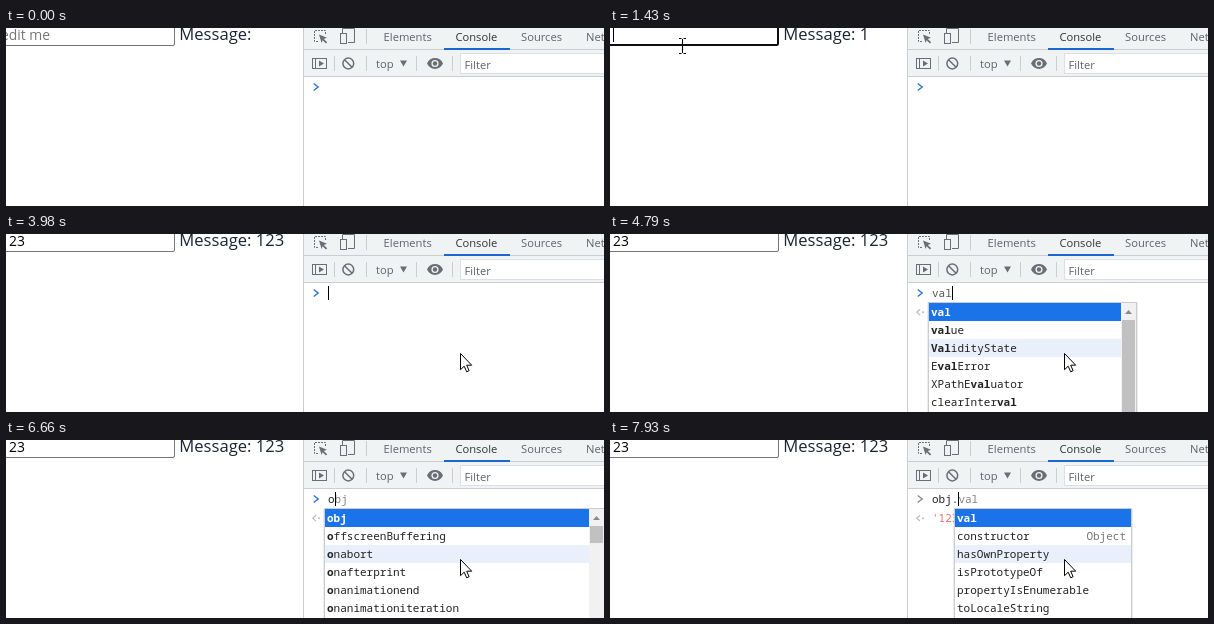
An HTML page for the animation above (8 s loop, 598 by 178 pixels).

```html
<!DOCTYPE html>
<html lang="en">
<head>
<meta charset="utf-8">
<title>Console demo</title>
<style>
  html, body { margin: 0; width: 100%; height: 100%; overflow: hidden; background: #fff; }
  svg { display: block; width: 598px; height: 178px; }
  text { white-space: pre; }
  .page { font-family: "Open Sans", "Noto Sans", sans-serif; }
  .ui { font: 11.2px "Open Sans", "Noto Sans", sans-serif; fill: #5f6368; }
  .code { font: 11px "Noto Sans Mono", "DejaVu Sans Mono", monospace; fill: #222; }
  .bold { font-weight: 700; }
  .icon { fill: none; stroke: #6a6e73; }
  .solid { fill: #6a6e73; }
  .line { fill: #cacdd1; }
  .crisp { shape-rendering: crispEdges; }
</style>
</head>
<body>
<svg viewBox="0 0 598 178">
  <!-- page -->
  <g class="page">
    <rect id="box" fill="#fff"/>
    <text id="field" x="-5" y="12" font-size="13.9"></text>
    <rect id="fieldCaret" class="crisp" y="-2" width="1" height="16"/>
    <text id="message" x="173.3" y="12" font-size="16.6" fill="#1a2433"></text>
  </g>

  <!-- developer tools -->
  <rect x="297" width="301" height="178" fill="#fff"/>
  <g class="crisp">
    <rect x="297" width="301" height="49" fill="#f0f3f4"/>
    <g class="line">
      <rect x="297" width="1" height="178"/>
      <rect x="298" y="21" width="300" height="1"/>
      <rect x="298" y="48" width="300" height="1"/>
      <rect x="360" y="1" width="1" height="15"/>
      <rect x="328" y="28" width="1" height="15"/>
      <rect x="360" y="28" width="1" height="15"/>
      <rect x="410" y="28" width="1" height="15"/>
      <rect x="446" y="28" width="1" height="15"/>
    </g>
    <rect x="438" y="20" width="66" height="2" fill="#1a66d2"/>
    <rect x="454.5" y="25.5" width="150" height="20" fill="#fff" stroke="#dcdfe3"/>
  </g>
  <g class="icon">
    <path d="M319.5 6V2.5H308.5V13.5H312" stroke-dasharray="2 1"/>
    <path d="M336.5 5V.5H348.5V14.5H342"/>
    <rect x="334.5" y="5.5" width="6" height="10"/>
    <rect x="306.5" y="30.5" width="14" height="10"/>
    <path d="M309.5 30.5V40.5"/>
    <circle cx="342.3" cy="35.5" r="5.4" stroke-width="1.5"/>
    <path d="M338.5 31.7L346.1 39.3" stroke-width="1.5"/>
  </g>
  <g class="solid">
    <path d="M313 6.5L321 9.8L317.8 11L321.2 14.3L320 15.5L316.6 12.2L315.6 15Z"/>
    <path d="M313 32.5L318 35.5L313 38.5Z"/>
    <path d="M394 32.5H401L397.5 38.5Z"/>
    <path fill-rule="evenodd" d="M421 35.5C424 28.3 434 28.3 437 35.5C434 42.7 424 42.7 421 35.5ZM425.4 35.5a3.6 3.6 0 1 0 7.2 0a3.6 3.6 0 1 0-7.2 0Z"/>
    <circle cx="429" cy="35.5" r="2.2"/>
  </g>
  <g class="ui">
    <text x="377.6" y="13">Elements</text>
    <text x="449.4" y="13" fill="#333">Console</text>
    <text x="515" y="13">Sources</text>
    <text x="580" y="13">Network</text>
    <text x="370" y="40">top</text>
    <text x="458.5" y="41">Filter</text>
  </g>

  <!-- console -->
  <path id="prompt" d="M307.7 55.5L312.2 59L307.7 62.5" fill="none" stroke-width="1.4"/>
  <g id="preview">
    <path d="M310 75.3L306.8 78.2L310 81.1" fill="none" stroke="#bcbcbc" stroke-width="1.2"/>
    <circle cx="313" cy="78.2" r="1" fill="#bcbcbc"/>
    <text id="result" class="code" x="322" y="82" style="fill:#dc7673">'123'</text>
  </g>
  <text id="typed" class="code" x="322" y="62.5"></text>
  <rect id="caret" class="crisp" y="52" width="1" height="14"/>
  <g id="popup"></g>

  <!-- pointer -->
  <g id="pointer">
    <path id="arrow" d="M.5 .5V16.7L4.2 13.2L6.7 18.8L9.1 17.7L6.7 12.2H11.7Z" fill="#fff" stroke="#000"/>
    <path id="beam" d="M-3-7.5H-.5M1.5-7.5H4M.5-7V7M-3 7.5H-.5M1.5 7.5H4" fill="none" stroke="#000" stroke-width="1.1"/>
  </g>
</svg>
<script>
const LOOP = 8000, CHAR = 6.6, ROW = 18, TOP = 69;
const el = id => document.getElementById(id);
const show = (id, on) => { el(id).style.display = on ? '' : 'none'; };
const within = (t, spans) => spans.some(([a, b]) => t >= a && t < b);
const latest = (list, t) => list.filter(e => e[0] <= t).pop();

// Pop-up lists: left edge, right edge, thumb length (0 = no scrollbar), entries
const wide = { x: 319, right: 598, thumb: 17 };
const lists = {
  v: { ...wide, items: ['val', 'value', 'var', 'visualViewport', 'void', 'ValidityState'] },
  va: { ...wide, items: ['val', 'value', 'var', 'ValidityState', 'CSSKeywordValue', 'CSSVariableReferenceValue'] },
  val: { x: 319, right: 526, thumb: 100, items: ['val', 'value', 'ValidityState', 'EvalError', 'XPathEvaluator', 'clearInterval'] },
  o: { ...wide, items: ['obj', 'offscreenBuffering', 'onabort', 'onafterprint', 'onanimationend', 'onanimationiteration'] },
  ob: { ...wide, items: ['obj', 'Object', 'HTMLObjectElement', 'IntersectionObserver', 'MutationObserver', 'PerformanceObserver'] },
  obj: { x: 319, right: 500, thumb: 0, items: ['obj', 'Object', 'HTMLObjectElement'] },
  'obj.': { x: 345, right: 521, thumb: 0, hint: 'Object',
    items: ['val', 'constructor', 'hasOwnProperty', 'isPrototypeOf', 'propertyIsEnumerable', 'toLocaleString'] }
};

// Time, typed text, greyed completion, pop-up shown
const typing = [
  [0, '', '', false],
  [4390, 'v', 'al', false], [4450, 'v', 'al', true], [4520, 'va', 'l', true], [4790, 'val', '', true],
  [5660, 'va', 'l', true], [5790, 'v', 'al', true], [5920, '', '', false],
  [6660, 'o', 'bj', true], [6940, 'ob', 'j', true], [7000, 'obj', '', true], [7730, 'obj.', 'val', true]
];
const fieldText = [[0, ''], [1430, '1'], [1630, '12'], [2170, '123']];
const caretOn = [[2920, 3440], [3980, 5320], [5660, 6460], [6660, 7530], [7730, LOOP]];

// Pointer moves: start, end, steps, from, to
const moves = [
  [130, 680, 9, [507, 168], [71, 32]],
  [820, 1020, 4, [71, 32], [72, 18]],
  [1700, 1900, 4, [72, 18], [74, 30]],
  [2300, 2780, 8, [74, 30], [364, 58]],
  [2920, 3050, 3, [364, 58], [370, 60]],
  [3190, 3520, 5, [370, 60], [454, 119]]
];

function pointerAt(t) {
  const m = moves.filter(m => m[0] <= t).pop();
  if (!m) return null;
  const [a, b, n, from, to] = m;
  const k = Math.min(n - 1, Math.floor((t - a) / (b - a) * (n - 1) + 1e-6));
  const u = a === 130 ? k / (n - 1) : (k + 1) / n;
  const e = u * u * (3 - 2 * u);
  return from.map((v, i) => Math.round(v + (to[i] - v) * e));
}

const rect = (x, y, w, h, fill) => `<rect class="crisp" x="${x}" y="${y}" width="${w}" height="${h}" fill="${fill}"/>`;

function label(item, query) {
  const i = query ? item.toLowerCase().indexOf(query) : -1;
  if (i < 0) return item;
  const end = i + query.length;
  return `${item.slice(0, i)}<tspan class="bold">${item.slice(i, end)}</tspan>${item.slice(end)}`;
}

function popupMarkup(query) {
  const { x, right, thumb, hint, items } = lists[query];
  const h = thumb || hint ? 120 : items.length * ROW;
  const inner = right - (thumb ? 15 : 0);
  const match = hint ? '' : query;
  let s = `<rect x="${x - 2}" y="${TOP - 1}" width="${right - x + 4}" height="${h + 3}" rx="1" fill="#000" opacity=".07"/>`;
  s += rect(x - 1, TOP - 1, right - x + 2, h + 2, '#c9ccd0') + rect(x, TOP, right - x, h, '#fff');
  items.forEach((item, i) => {
    const y = TOP + i * ROW;
    if (i === 0) s += rect(x, y, inner - x, ROW, '#1a73e8');
    if (i === 2) s += rect(x, y, inner - x, ROW, '#e9f0fb');
    const first = i === 0 ? ' bold" style="fill:#fff' : '';
    s += `<text class="code${first}" x="${x + 2}" y="${y + 13}">${i ? label(item, match) : item}</text>`;
  });
  if (hint) s += `<text class="code" x="${right - 5}" y="${TOP + ROW + 13}" text-anchor="end" style="fill:#777">${hint}</text>`;
  if (thumb) {
    s += rect(inner, TOP, 15, h, '#f1f1f1') + rect(inner + 1, 86, 13, thumb, '#c1c1c1');
    s += `<path d="M${inner + 4} 80h7l-3.5-4Z" fill="#8a8a8a"/>`;
  }
  return s;
}

function set(id, attrs) {
  for (const k in attrs) el(id).setAttribute(k, attrs[k]);
}

let shown = null;

function draw(t) {
  // page
  const value = latest(fieldText, t)[1];
  const focus = t >= 1090 && t < 2920;
  set('box', focus
    ? { x: -20, y: -9, width: 188, height: 26, rx: 1.5, stroke: '#101010', 'stroke-width': 2 }
    : { x: -20.5, y: -8.5, width: 189, height: 26, rx: 1.5, stroke: '#767676', 'stroke-width': 1 });
  el('field').textContent = value || 'edit me';
  el('field').style.fill = value ? '#000' : '#757575';
  el('message').textContent = 'Message: ' + value;
  show('fieldCaret', focus && t >= 1430 && t < 2700);
  set('fieldCaret', { x: Math.round(-5 + 7.95 * value.length) });

  // console
  const [, text, ghost, open] = latest(typing, t);
  const color = text[0] === 'v' ? '#555' : '#222';
  el('typed').innerHTML = `<tspan style="fill:${color}">${text}</tspan><tspan style="fill:#858585">${ghost}</tspan>`;
  show('caret', within(t, caretOn));
  set('caret', { x: Math.round(322 + CHAR * text.length) });
  set('prompt', { stroke: text === 'obj.' ? '#8a8d91' : '#2d73d0' });
  show('preview', text);
  show('result', t >= 7930);
  const query = open ? text : '';
  if (query !== shown) {
    el('popup').innerHTML = query ? popupMarkup(query) : '';
    shown = query;
  }

  // pointer
  const p = pointerAt(t);
  show('pointer', p);
  if (p) {
    const [x, y] = p;
    const beam = x > 297 ? y < 68 : x < 169 && y < 20;
    show('beam', beam);
    show('arrow', !beam);
    set('pointer', { transform: `translate(${x} ${y})` });
  }
}

const start = performance.now();
function tick() {
  draw((performance.now() - start) % LOOP);
  requestAnimationFrame(tick);
}
tick();
</script>
</body>
</html>
```
